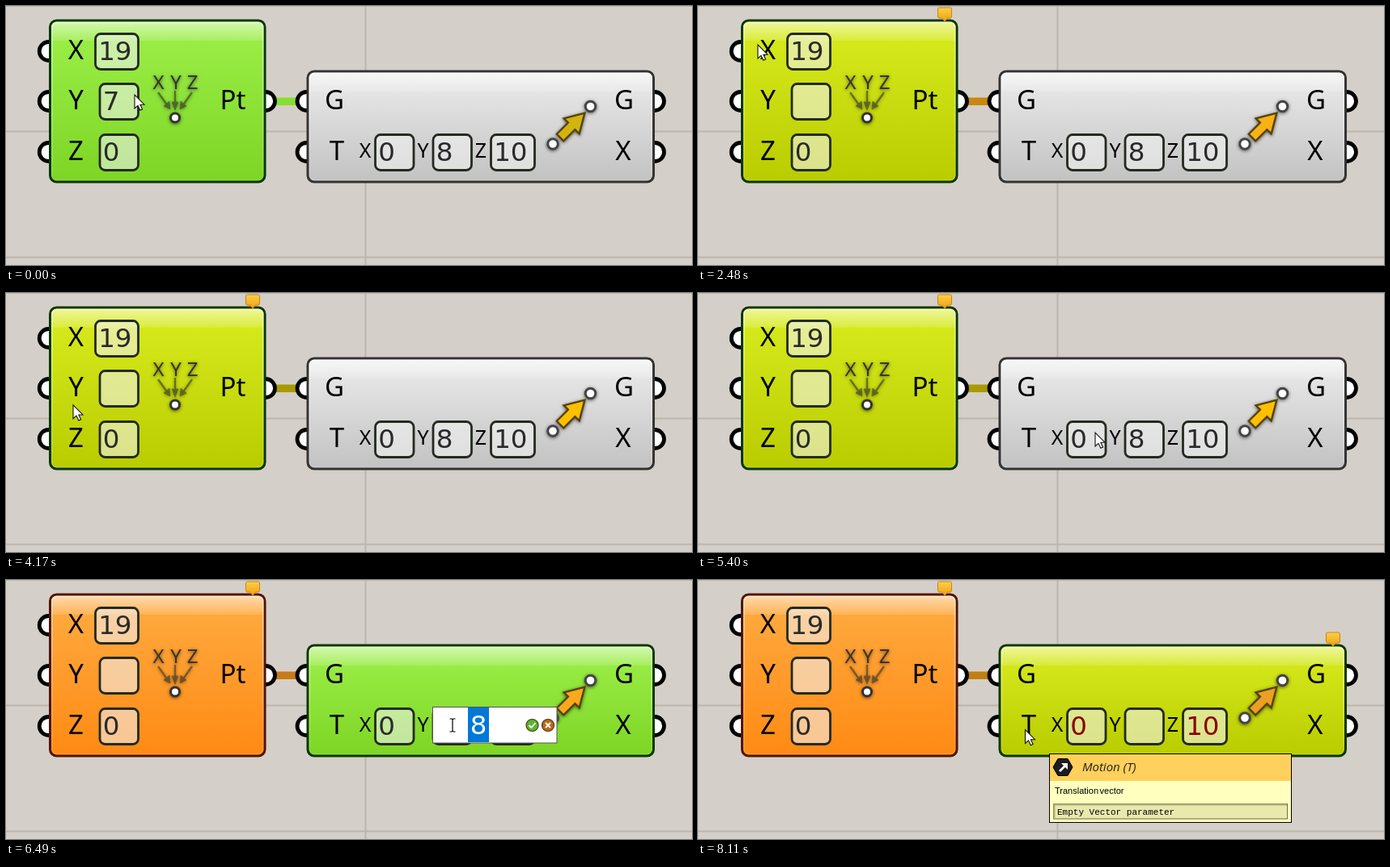
Animation, 848 px wide and 321 px high, one loop 9.84 s. Source, as an HTML page:

```html
<!DOCTYPE html>
<html lang="en">
<head>
<meta charset="utf-8">
<title>Node editor</title>
<style>
  html, body { margin: 0; width: 100%; height: 100%; overflow: hidden; background: #d4cfc8; }
  svg { display: block; width: 100%; height: 100%; }
  text { font: 33px 'Noto Sans', 'Open Sans', sans-serif; text-anchor: middle; }
  .value { font: 32.5px 'DejaVu Sans', sans-serif; text-anchor: start; }
  .small { font-size: 25px; }
  .axis { font-size: 24px; font-weight: 500; fill: #37332b; }
  .tip text { text-anchor: start; }
  .tip .title { font: italic 15px 'Open Sans', sans-serif; fill: #222; }
  .tip .info { font: 11px 'Liberation Sans', sans-serif; word-spacing: -1.5px; }
  .tip .data { font: 11px 'Liberation Mono', monospace; }
</style>
</head>
<body>
<svg viewBox="0 0 848 321" preserveAspectRatio="none">
  <defs id="defs"></defs>
  <g id="scene"></g>
</svg>
<script>
const LOOP = 9840;

// body top, body bottom, outline
const SKINS = {
  green: ['#9df04a', '#7dd524', '#0a3703'],
  yellow: ['#d9ec1e', '#b8cc00', '#0a3703'],
  orange: ['#ffac42', '#ff8a14', '#501503'],
  grey: ['#ececec', '#c2c2c2', '#333']
};

// start, end, step count, from, to
const MOVES = [
  [70, 350, 5, 159, 110, 141, 117],
  [2140, 2480, 6, 141, 117, 74, 48],
  [3180, 3390, 4, 74, 48, 82, 125],
  [4170, 4380, 4, 82, 125, 86, 180],
  [5140, 5400, 5, 86, 180, 491, 173],
  [5470, 5740, 5, 491, 173, 552, 180],
  [7060, 7760, 12, 552, 180, 404.5, 185.5]
];

const LOCAL = 'Locally defined value…';
const TIPS = [
  [2900, 3180, 'X coordinate (X)', '{x} coordinate', [LOCAL, '19']],
  [3740, 4170, 'Y coordinate (Y)', '{y} coordinate', ['Empty Number parameter']],
  [4720, 5140, 'Z coordinate (Z)', '{z} coordinate', [LOCAL, '0']],
  [8110, LOOP, 'Motion (T)', 'Translation vector', ['Empty Vector parameter']]
];

// start, wire, arrow fill
const TINTS = [
  [0, '#86df30', '#d3b40c'],
  [550, '#86df30', '#dba90c'],
  [1940, '#c8880f', '#f9b112'],
  [2900, '#a89a00', '#fcc004'],
  [5880, '#c87a18', '#faa81c'],
  [6990, '#c07f10', '#eaa024']
];

const text = (x, y, s, cls = '', fill = '#000') =>
  `<text x="${x}" y="${y}" class="${cls}" fill="${fill}">${s}</text>`;
const rect = (x, y, w, h, rest) =>
  `<rect x="${x}" y="${y}" width="${w}" height="${h}" ${rest}/>`;
const circle = (x, y, r, rest) => `<circle cx="${x}" cy="${y}" r="${r}" ${rest}/>`;
const path = (d, rest) => `<path d="${d}" ${rest}/>`;
const group = (x, y, body, cls = '') =>
  `<g transform="translate(${x} ${y})" class="${cls}">${body}</g>`;
const gradient = (id, a, b, oa = 1, ob = 1) =>
  `<linearGradient id="${id}" x2="0" y2="1"><stop stop-color="${a}" stop-opacity="${oa}"/>` +
  `<stop offset="1" stop-color="${b}" stop-opacity="${ob}"/></linearGradient>`;

const grip = (x, y) => circle(x, y, 11.5, 'fill="#fff" stroke="#000" stroke-width="4.8"');
const dot = (x, y, r) => circle(x, y, r, 'fill="#fff" stroke="#444" stroke-width="3"');

function body(x, y, w, h, skin) {
  return rect(x, y, w, h, `rx="8" fill="url(#${skin})" stroke="${SKINS[skin][2]}" stroke-width="3"`) +
    rect(x + 2.3, y + 2.3, w - 4.6, h - 4.6, 'rx="6" fill="none" stroke="url(#rim)" stroke-width="1.8"') +
    path(`M${x + 2} ${y + 25}V${y + 8}q0-6 6-6H${x + w - 8}q6 0 6 6V${y + 25}z`, 'fill="url(#gloss)"');
}

function field(x, y, w, value, color = '#2a2a2a') {
  return rect(x, y - 21.5, w, 44, 'rx="6.5" fill="#f2f2f2" fill-opacity=".57" stroke="#242a20" stroke-width="2.8"') +
    text(x + 3.7, y + 10.5, value, 'value', color);
}

const balloon = (x, y) => group(x, y,
  path('M2 0H15q2 0 2 2V11q0 2-2 2H12L8.5 17L5 13H2q-2 0-2-2V2q0-2 2-2z',
    'fill="url(#warn)" stroke="#c4861a"'));

function pointIcon() {
  const letters = text(188.5, 103, 'X', 'axis') + text(210, 103, 'Y', 'axis') + text(230.5, 103, 'Z', 'axis');
  const arrows = path('M188 107L200 124M209 105V122M230 107L218 124', 'stroke-width="2.4"') +
    path('M195 124L203 128L202 118zM205 119L209 129L213 119zM216 118L215 128L223 124z', 'fill="#3a3a2a"');
  return `<g filter="url(#shade)">${letters}<g fill="none" stroke="#3a3a2a" opacity=".6">${arrows}</g>` +
    circle(209, 138.5, 5.5, 'fill="#fff" stroke="#333" stroke-width="3"') + '</g>';
}

function moveIcon(fill) {
  return `<g filter="url(#shade)">${dot(676, 171, 6.3)}${dot(722.5, 124.5, 6.3)}` +
    path('M0-6H20V-13.5L43 0L20 13.5V6H0z',
      `transform="translate(685 163) rotate(-45)" fill="${fill}" stroke="#54430c" stroke-width="2.4"`) + '</g>';
}

function button(x, fill, mark) {
  return circle(x, 23, 7.5, `fill="${fill}" stroke="#4a3a14" stroke-width="1.2"`) +
    group(x, 23, path(mark, 'fill="none" stroke="#fff" stroke-width="1.8"'));
}

function editor(x, y, value) {
  const content = value
    ? rect(44, 1, 26, 43, 'fill="#0078d7"') + text(57, 34, value, 'value" style="text-anchor:middle', '#fff')
    : rect(57, 1, 1, 43, 'fill="#000"');
  return group(x, y, rect(.5, .5, 153.5, 44.5, 'fill="#fff" stroke="#555"') + content +
    button(123.5, '#58b52c', 'M-4 0L-1 3L4-3') + button(143, '#b8681c', 'M-3-3L3 3M3-3L-3 3'));
}

function tooltip(x, y, title, info, lines) {
  const extra = (lines.length - 1) * 14;
  return group(x, y,
    rect(.5, .5, 299, 85 + extra, 'fill="#ffffbe" stroke="#000"') +
    rect(1, 1, 298, 33, 'fill="#ffd05c"') +
    path('M5 17L11 6.5H23L29 17L23 27.5H11z', 'fill="#1c1c1c" stroke="#000"') +
    path('M12 21L18 15L15 12H23V20L20 17L14 23z', 'fill="#fff"') +
    text(41, 22, title, 'title') + text(7, 50, info, 'info') +
    rect(5.5, 62.5, 289, 18.5 + extra, 'fill="#e9e9ae" stroke="#6b6b4e"') +
    path(`M6.5 ${80.5 + extra}V63.5H294`, 'fill="none" stroke="#b4b47e" stroke-width="2"') +
    lines.map((s, i) => text(10, 76 + i * 14, s, 'data')).join(''), 'tip');
}

function cursorAt(t) {
  let pos = [159, 110];
  for (const [a, b, n, x0, y0, x1, y1] of MOVES) {
    if (t < a) break;
    const step = Math.min(n, 1 + Math.floor((t - a) / (b - a) * (n - 1) + 1e-6));
    const u = step / n;
    pos = [x0 + (x1 - x0) * u, y0 + (y1 - y0) * u];
  }
  return pos;
}

const ARROW = path('M0 0V17L4 13.3L6.8 19.3L9.6 18L6.9 12.2H12z', 'fill="#fff" stroke="#111" stroke-width="1.1"');
const IBEAM = path('M-3.5-8H-1L0-7L1-8H3.5M0-7V7M-3.5 8H-1L0 7L1 8H3.5', 'fill="none" stroke="#000" stroke-width="1.2"');

function scene(t) {
  const skin1 = t < 1940 ? 'green' : t < 5880 ? 'yellow' : 'orange';
  const skin2 = t < 5880 ? 'grey' : t < 6990 ? 'green' : 'yellow';
  const [, wire, arrow] = TINTS.filter(s => s[0] <= t).pop();
  const edit1 = t >= 550 && t < 1940, edit2 = t >= 5950 && t < 6990;
  const bad = t >= 6990, ink = bad ? '#8b0000' : '#2a2a2a';
  const [cx, cy] = cursorAt(t);
  const tip = TIPS.find(([a, b]) => t >= a && t < b);

  return path('M444.5 0V321M0 0H848M0 155.5H848M0 311.5H848', 'stroke="#bbb6af" stroke-width="2"') +
    rect(321, 113.5, 51, 9.5, `fill="${wire}"`) +
    [56, 118, 181].map(y => grip(52.7, y)).join('') + grip(321, 118) +
    [118, 181].map(y => grip(371.5, y) + grip(802, y)).join('') +

    body(54.5, 18, 265.5, 200, skin1) +
    text(86.5, 66, 'X') + text(86.5, 128, 'Y') + text(86.5, 191, 'Z') + text(280.5, 128, 'Pt') +
    field(110.5, 56, 53, '19') + field(116, 118, 47.5, t < 1940 ? '7' : '') + field(116, 181, 47.5, '0') +
    pointIcon() + (t >= 1940 ? balloon(296.5, 2) : '') +

    body(373, 81, 427.5, 137, skin2) +
    text(406, 128, 'G') + text(409, 191, 'T') + text(764, 128, 'G') + text(763, 191, 'X') +
    text(444, 188, 'X', 'small') + text(515.5, 188, 'Y', 'small') + text(587, 188, 'Z', 'small') +
    field(456.5, 181, 47.5, '0', ink) + field(528, 181, 47.5, bad ? '' : '8') + field(599.5, 181, 54, '10', ink) +
    moveIcon(arrow) + (bad ? balloon(776.5, 65) : '') +

    (edit1 ? editor(115, 94, t < 1590 ? '7' : '') : '') +
    (edit2 ? editor(527, 157, t < 6700 ? '8' : '') : '') +
    (tip ? tooltip(Math.round(cx) + 29, Math.round(cy) + 29, ...tip.slice(2)) : '') +
    group(cx, cy, edit1 || edit2 ? IBEAM : ARROW);
}

document.getElementById('defs').innerHTML =
  Object.entries(SKINS).map(([id, [a, b]]) => gradient(id, a, b)).join('') +
  gradient('gloss', '#fff', '#fff', .55, .14) + gradient('rim', '#fff', '#fff', .5, .1) +
  gradient('warn', '#ffcf45', '#f0a012') +
  '<filter id="shade" x="-20%" y="-20%" width="140%" height="140%">' +
  '<feDropShadow dx="0" dy="1" stdDeviation="2" flood-opacity=".6"/></filter>';

const stage = document.getElementById('scene');
const start = performance.now();
let last = '';
function draw() {
  const markup = scene((performance.now() - start) % LOOP);
  if (markup !== last) stage.innerHTML = last = markup;
  requestAnimationFrame(draw);
}
draw();
</script>
</body>
</html>
```
